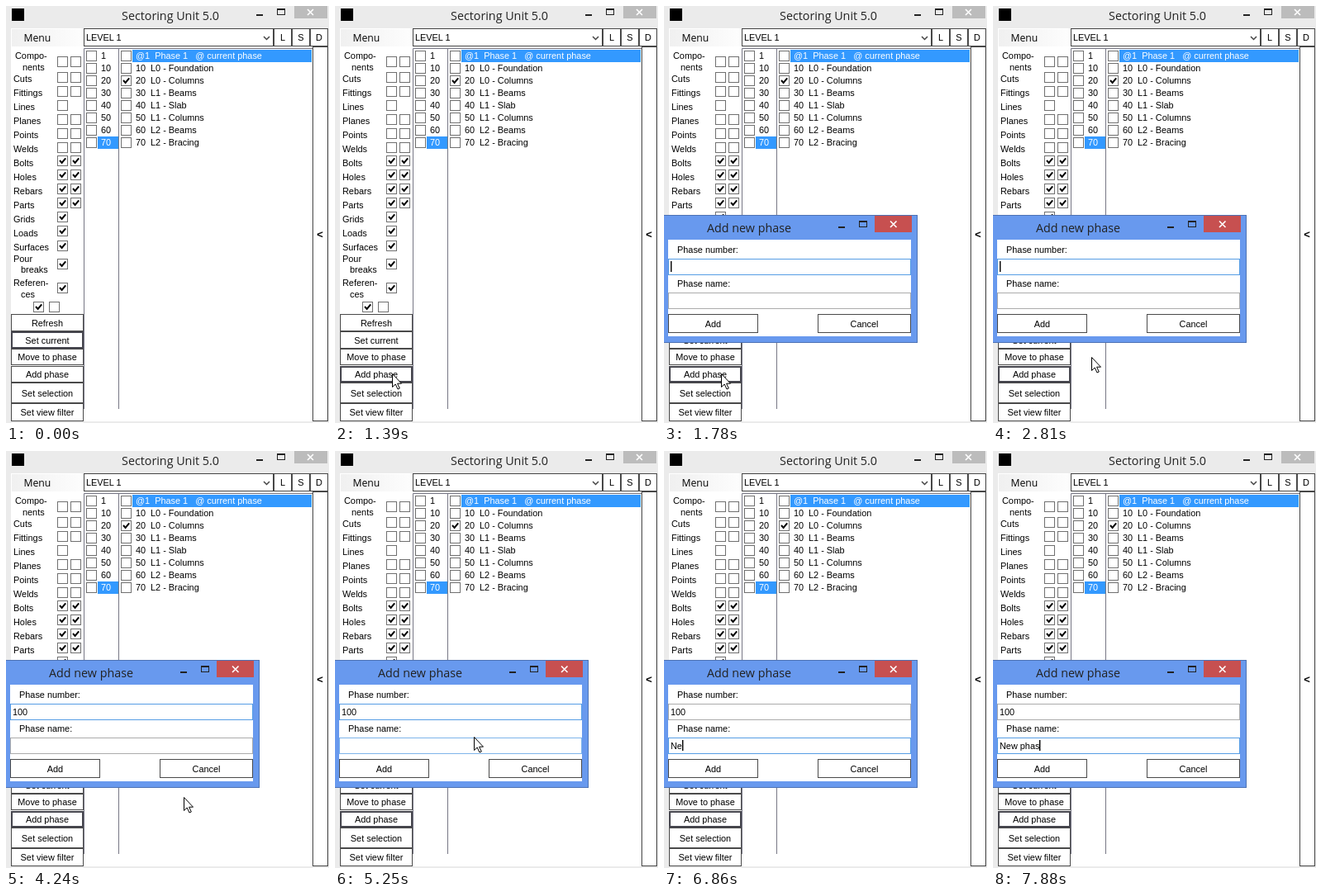
Animation of 391 by 505 pixels, one loop 8 s. Source, as an HTML page:

```html
<!DOCTYPE html>
<html lang="en">
<head>
<meta charset="utf-8">
<title>Add new phase</title>
<style>
  html, body { margin: 0; width: 100%; height: 100%; overflow: hidden; background: #ebebeb; }
  svg { display: block; width: 391px; height: 505px; }
  text { font: 10.9px "Liberation Sans", Arial, sans-serif; fill: #000; white-space: pre; }
  .title { font: 14.3px "Open Sans", "Noto Sans", sans-serif; fill: #222; }
  .menu { font: 12.2px "Open Sans", "Noto Sans", sans-serif; }
  .mid { text-anchor: middle; }
</style>
</head>
<body>
<svg id="stage" viewBox="0 0 391 505">
  <defs>
    <linearGradient id="strip">
      <stop offset="0" stop-color="#f0f0f0"/>
      <stop offset="1" stop-color="#fdfdfd"/>
    </linearGradient>
  </defs>
</svg>
<script>
const LOOP = 8000;
const stage = document.getElementById('stage');

function add(parent, tag, attrs, content) {
  const el = document.createElementNS('http://www.w3.org/2000/svg', tag);
  for (const k in attrs) el.setAttribute(k, attrs[k]);
  if (content !== undefined) el.textContent = content;
  parent.appendChild(el);
  return el;
}
const fill = (p, x, y, w, h, color) => add(p, 'rect', { x, y, width: w, height: h, fill: color });
// Crisp outlined box from pixel (x, y) to pixel (x2, y2).
const box = (p, x, y, x2, y2, stroke, color = '#fff') =>
  add(p, 'rect', { x: x + .5, y: y + .5, width: x2 - x, height: y2 - y, fill: color, stroke });
const label = (p, x, y, s, cls = '') => add(p, 'text', { x, y, class: cls }, s);
const line = (p, d, stroke, width = 1) =>
  add(p, 'path', { d, stroke, 'stroke-width': width, fill: 'none' });

function check(x, y, on) {
  box(stage, x, y - 6, x + 12, y + 6, '#707070');
  if (on) line(stage, `M${x + 3} ${y}l2.6 3 4.6-5.6`, '#000', 2);
}

function button(p, x, y, x2, y2, s) {
  const b = box(p, x, y, x2, y2, '#4a4a4a');
  label(p, (x + x2) / 2 + .5, (y + y2) / 2 + 4.5, s, 'mid');
  return b;
}

function winButtons(p, x, y) {
  fill(p, x, y + 6, 8, 2, '#222');
  box(p, x + 25, y - 1, x + 34, y + 6, '#222', 'none');
  fill(p, x + 25, y - 1, 10, 2, '#222');
}

function drawWindow() {
  fill(stage, 0, 0, 391, 505, '#ebebeb');
  fill(stage, 6, 27, 384, 476, '#fff');
  fill(stage, 7, 3, 15, 15, '#000');
  label(stage, 199, 17, 'Sectoring Unit 5.0', 'title mid');
  winButtons(stage, 303, 4);
  fill(stage, 349, 0, 40, 15, '#bcbcbc');
  line(stage, 'M365 4l7 7M372 4l-7 7', '#fff', 1.6);

  fill(stage, 7, 28, 85, 21, 'url(#strip)');
  label(stage, 21.5, 43, 'Menu', 'menu');
  box(stage, 94, 27, 323, 48, '#444');
  label(stage, 97, 42, 'LEVEL 1');
  line(stage, 'M312 37l3.5 3.5 3.5-3.5', '#444', 1.5);
  ['L', 'S', 'D'].forEach((s, i) => button(stage, 324 + 22 * i, 27, 345 + 22 * i, 48, s));

  line(stage, 'M94.5 488V51.5H371M136.5 52V488', '#777785');
  box(stage, 371, 49, 389, 502, '#444');
  add(stage, 'text', { x: 380, y: 281, class: 'mid', style: 'font-weight:bold;font-size:13px' }, '<');
}

function drawLists() {
  const names = ['', 'L0 - Foundation', 'L0 - Columns', 'L1 - Beams', 'L1 - Slab',
    'L1 - Columns', 'L2 - Beams', 'L2 - Bracing'];
  fill(stage, 111, 158, 25, 15, '#3399ff');
  fill(stage, 153, 53, 217, 15, '#3399ff');
  names.forEach((name, i) => {
    const y = 60 + 15 * i, num = i ? i * 10 : 1;
    check(97, y, false);
    check(139, y, i === 2);
    const n = label(stage, 115, y + 4, num);
    if (i === 7) n.style.fill = '#fff';
    if (i) {
      label(stage, 157, y + 4, num);
      label(stage, 175, y + 4, name);
    } else {
      label(stage, 157, y + 4, '@1  Phase 1   @ current phase').style.fill = '#fff';
    }
  });
}

function drawFilters() {
  const split = [['Compo-', 11, 60], ['nents', 20, 74], ['Pour', 9, 306], ['breaks', 18, 319],
    ['Referen-', 9, 335], ['ces', 18, 349]];
  split.forEach(([s, x, y]) => label(stage, x, y + 4, s));
  ['Cuts', 'Fittings', 'Lines', 'Planes', 'Points', 'Welds', 'Bolts', 'Holes', 'Rebars',
    'Parts', 'Grids', 'Loads', 'Surfaces'].forEach((s, i) => {
    label(stage, 9, 91.5 + 17 * i, s);
    const y = Math.round(86 + 16.9 * i);
    if (i < 12) check(62, y, i > 5);
    if (i !== 2 && i < 10) check(78, y, i > 5);
  });
  check(62, 67, false);
  check(78, 67, false);
  [290, 312, 341].forEach(y => check(62, y, true));
  check(33, 364, true);
  check(52, 364, false);
}

drawWindow();
drawLists();
drawFilters();
button(stage, 6, 373, 93, 393, 'Refresh');
button(stage, 6, 394, 93, 414, 'Set current');
button(stage, 6, 415, 93, 434, 'Move to phase');
button(stage, 6, 436, 93, 455, 'Add phase');
button(stage, 6, 456, 93, 480, 'Set selection');
button(stage, 6, 481, 93, 502, 'Set view filter');
const ring = (y, height) => add(stage, 'rect',
  { x: 7, y, width: 86, height, fill: 'none', stroke: '#45454d', 'stroke-width': 2 });
const currentRing = ring(395, 19), addRing = ring(437, 18);

const dialog = add(stage, 'g', {});
box(dialog, -2, 253, 306, 407, '#4d72b4', '#6899ee');
label(dialog, 103, 274, 'Add new phase', 'title mid');
winButtons(dialog, 211, 261);
fill(dialog, 255, 254, 45, 20, '#c75050');
line(dialog, 'M274 260.5l7.5 7.5M281.5 260.5l-7.5 7.5', '#fff', 1.6);
fill(dialog, 5, 283, 294, 117, '#fff');
label(dialog, 16, 299, 'Phase number:');
label(dialog, 16, 340, 'Phase name:');
button(dialog, 5, 373, 113, 395, 'Add');
button(dialog, 186, 373, 298, 395, 'Cancel');

function field(y) {
  return {
    frame: box(dialog, 5, y, 298, y + 19, '#ababab'),
    text: label(dialog, 8, y + 14, ''),
    caret: fill(dialog, 8, y + 3, 1.4, 13, '#000'),
  };
}
const number = field(306), phase = field(347);

const pointer = add(stage, 'path', {
  d: 'M.5 .5V16.5L4.2 13L7 19L9.3 18L6.6 12.2H11.5Z', fill: '#fff', stroke: '#000',
});

// Each track holds [start time, value]; a value stays until the next one.
const tracks = {
  pointer: [[0, null], [390, [229, 487]], [590, [158, 472]], [790, [95, 455]], [980, [69, 445]],
    [1990, [96, 436]], [2200, [119, 425]], [3220, null], [4020, [168, 423]], [4240, [215, 419]],
    [4440, [207, 396]], [4640, [186, 367]], [4830, [168, 346]], [6660, null]],
  number: [[0, ''], [3220, '1'], [3420, '10'], [3610, '100']],
  phase: [[0, ''], [6660, 'N'], [6860, 'Ne'], [7070, 'New'], [7270, 'New '], [7480, 'New p'],
    [7680, 'New ph'], [7880, 'New phas']],
  numberCaret: [[0, true], [2200, false], [2810, true], [4020, false], [4640, true], [5250, false]],
  phaseCaret: [[0, false], [5650, true], [6240, false], [6660, true]],
  numberFrame: [[0, '#569de5'], [5650, '#7ba4cf'], [5850, '#94a7bd'], [6050, '#a3aab2'], [6240, '#ababab']],
  phaseFrame: [[0, '#ababab'], [4830, '#96b0ca'], [5250, '#7eb4ea'], [5650, '#6aa8e7'], [5850, '#569de5']],
};

function at(name, t) {
  let value;
  for (const [start, v] of tracks[name]) if (t >= start) value = v;
  return value;
}
const show = (el, on) => el.setAttribute('visibility', on ? 'inherit' : 'hidden');

function updateField(f, name, t) {
  f.frame.setAttribute('stroke', at(name + 'Frame', t));
  const s = at(name, t);
  if (f.text.textContent !== s) f.text.textContent = s;
  f.caret.setAttribute('x', 8 + Math.round(s ? f.text.getComputedTextLength() : 0));
  show(f.caret, at(name + 'Caret', t));
}

function render(t) {
  show(currentRing, t < 1390);
  show(addRing, t >= 980);
  const opening = t < 1780;
  show(dialog, t >= 1580);
  dialog.setAttribute('opacity', opening ? .84 : 1);
  dialog.setAttribute('transform', opening ? 'translate(2.1 5.5) scale(.986 .982)' : '');
  updateField(number, 'number', t);
  updateField(phase, 'phase', t);
  const p = at('pointer', t);
  show(pointer, p);
  if (p) pointer.setAttribute('transform', `translate(${p})`);
}

const begin = performance.now();
function tick() {
  render((performance.now() - begin) % LOOP);
  requestAnimationFrame(tick);
}
tick();
</script>
</body>
</html>
```
